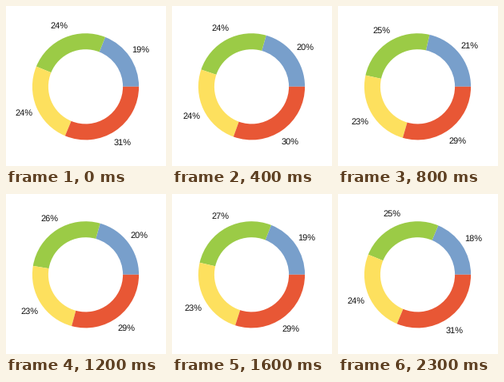
Write a matplotlib script that moves like this. It is 200 px wide and 200 px high and loops after 2400 ms.

```python
import numpy as np
import matplotlib.pyplot as plt
from matplotlib.animation import FuncAnimation
from matplotlib.patches import Wedge

SIZE, DPI = 200, 100
FRAMES, INTERVAL = 24, 100
CX, CY = 99.5, 99.2
OUTER, RING, LABEL_R = 66.6, 20, 83.5
FONT_PX = 11

COLORS = ["#789fcb", "#9bcb46", "#fde05e", "#e85735"]
# mean share, swing and peak time (in steps) of the first three slices
WAVES = [(19.8, 1.6, 8.0), (25.8, 1.6, 15.5), (24.15, 0.75, 0.8)]

plt.rcParams["font.family"] = "Liberation Sans"
plt.rcParams["text.hinting"] = "none"

fig = plt.figure(figsize=(SIZE / DPI, SIZE / DPI), dpi=DPI, facecolor="white")
ax = fig.add_axes([0, 0, 1, 1])
ax.set_xlim(0, SIZE)
ax.set_ylim(0, SIZE)
ax.axis("off")

slices = [ax.add_patch(Wedge((CX, CY), OUTER, 0, 90, width=RING, fc=c, lw=0))
          for c in COLORS]
labels = [ax.text(0, 0, "", size=FONT_PX * 72 / DPI, color="#111111",
                  ha="center", va="baseline") for _ in COLORS]


def shares(step):
    first = [mean + swing * np.cos(2 * np.pi * (step - peak) / FRAMES)
             for mean, swing, peak in WAVES]
    return first + [100 - sum(first)]


def update(step):
    start = 0
    for piece, label, share in zip(slices, labels, shares(step)):
        end = start + share * 3.6
        piece.set_theta1(start)
        piece.set_theta2(end)
        mid = np.radians((start + end) / 2)
        label.set_position((CX + LABEL_R * np.cos(mid),
                            CY + LABEL_R * np.sin(mid) - 4))
        label.set_text(f"{int(share)}%")
        start = end
    return slices + labels


anim = FuncAnimation(fig, update, frames=FRAMES, interval=INTERVAL,
                     repeat=True, repeat_delay=0)
plt.show()
```
